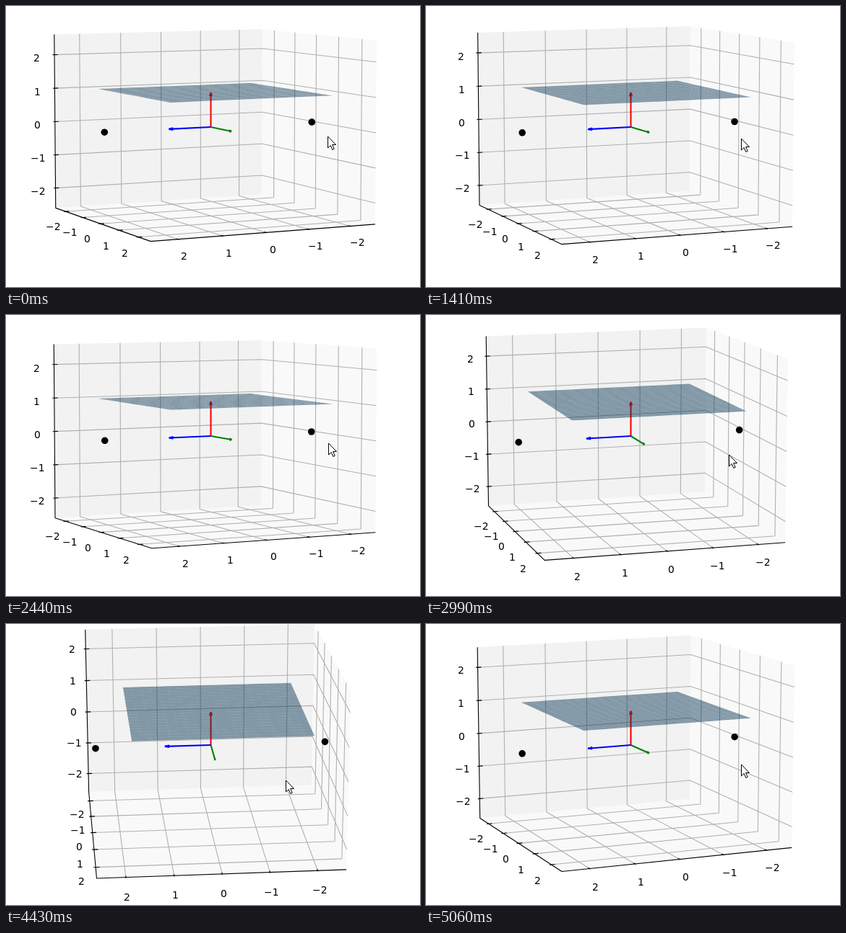
An HTML page with a canvas that plays this animation: 573 px wide and 390 px high, repeating every 5140 ms.

```html
<!DOCTYPE html>
<html lang="en">
<head>
<meta charset="utf-8">
<title>Rotating 3D axes</title>
<style>
html, body { margin: 0; width: 100%; height: 100%; overflow: hidden; background: #fff; }
canvas { display: block; }
</style>
</head>
<body>
<canvas id="view" width="573" height="390"></canvas>
<script>
const ctx = document.getElementById('view').getContext('2d');
const LOOP = 5140, STEP = 78.5;
const ZOOM = 2678, CX = 283.5, CY = 168, DIST = 10;
const SXY = 0.2381, SZ = 0.17857;      // data unit to world unit
const B = 2.604, LABEL = B + 0.3;      // pane bound, label position
const LO = -2, HI = 1.8, CELL = 0.2;   // surface mesh

// Mouse drags: each turns the view to a new azimuth and elevation
const START = { azim: 64.1, elev: 5.8 };
const DRAGS = [
  { from: 0, to: 620, azim: 72.7, elev: 8.3 },
  { from: 930, to: 1410, azim: 67.1, elev: 7.1 },
  { from: 1410, to: 1880, azim: 61.2, elev: 4.8 },
  { from: 1960, to: 2440, azim: 63.7, elev: 5 },
  { from: 2440, to: 3540, azim: 82.9, elev: 16.4 },
  { from: 3540, to: 3770, azim: 84.8, elev: 18.8 },
  { from: 4430, to: 5060, azim: 67.2, elev: 10.8 }
];

// The view is redrawn in discrete steps during a drag
function poseAt(t) {
  let { azim, elev } = START;
  for (const d of DRAGS) {
    if (t < d.from) break;
    const steps = Math.round((d.to - d.from) / STEP);
    const p = Math.min(1, Math.floor((t - d.from) / (d.to - d.from) * steps) / steps);
    azim += (d.azim - azim) * p;
    elev += (d.elev - elev) * p;
  }
  return { azim, elev };
}

function camera({ azim, elev }) {
  const a = azim * Math.PI / 180, e = elev * Math.PI / 180;
  const ca = Math.cos(a), sa = Math.sin(a), ce = Math.cos(e), se = Math.sin(e);
  return ([x, y, z]) => {
    const side = (y * ca - x * sa) * SXY;
    const near = (x * ca + y * sa) * SXY;
    const up = z * SZ;
    const k = ZOOM / (DIST - near * ce - up * se);
    return [CX + side * k, CY - (up * ce - near * se) * k];
  };
}

function path(points) {
  ctx.beginPath();
  points.forEach(p => ctx.lineTo(...p));
}

function line(points, color, width = 1.1) {
  path(points);
  ctx.strokeStyle = color;
  ctx.lineWidth = width;
  ctx.stroke();
}

function fill(points, color) {
  path(points);
  ctx.closePath();
  ctx.fillStyle = color;
  ctx.fill();
}

function label(value, [x, y]) {
  const text = String(value).replace('-', '\u2212');
  ctx.fillStyle = '#000';
  ctx.fillText(text, Math.round(x - ctx.measureText(text).width / 2), Math.round(y + 10.4));
}

function drawBox(proj) {
  const pts = list => list.map(proj);
  fill(pts([[-B, -B, -B], [-B, B, -B], [-B, B, B], [-B, -B, B]]), '#f9f9f9');
  fill(pts([[-B, -B, -B], [B, -B, -B], [B, -B, B], [-B, -B, B]]), '#f2f2f2');
  fill(pts([[-B, -B, -B], [B, -B, -B], [B, B, -B], [-B, B, -B]]), '#f9f9f9');

  for (let t = -2; t <= 2; t++) {
    line(pts([[t, B, -B], [t, -B, -B], [t, -B, B]]), '#b0b0b0');
    line(pts([[B, t, -B], [-B, t, -B], [-B, t, B]]), '#b0b0b0');
    line(pts([[B, -B, t], [-B, -B, t], [-B, B, t]]), '#b0b0b0');
  }

  line(pts([[B, -B, B], [B, -B, -B], [B, B, -B], [-B, B, -B]]), '#000');
  const out = B + 0.042, inner = B - 0.083;
  for (let t = -2; t <= 2; t++) {
    line(pts([[t, out, -B], [t, inner, -B]]), '#000');
    line(pts([[out, t, -B], [inner, t, -B]]), '#000');
    line(pts([[out, -B, t], [inner, -B, t]]), '#000');
    label(t, proj([t, LABEL, -LABEL]));
    label(t, proj([LABEL, t, -LABEL]));
    label(t, proj([LABEL, -LABEL, t]));
  }
}

// Unit vector along one axis, its head spread along another
function arrow(proj, axis, spread, color) {
  const tip = [0, 0, 0];
  tip[axis] = 1;
  const barb = side => {
    const p = tip.map(v => v * 0.9);
    p[spread] = side * 0.027;
    return proj(p);
  };
  line([proj([0, 0, 0]), proj(tip)], color, 2.1);
  line([barb(1), proj(tip), barb(-1)], color, 2.1);
}

function drawSurface(proj) {
  for (let x = LO; x < HI - 0.01; x += CELL) {
    for (let y = LO; y < HI - 0.01; y += CELL) {
      const cell = [[x, y, 1], [x + CELL, y, 1], [x + CELL, y + CELL, 1], [x, y + CELL, 1]];
      fill(cell.map(proj), 'rgba(15,60,90,.5)');
    }
  }
}

function drawCursor({ azim, elev }) {
  const x = 444.5 - (azim - START.azim) * 2.8, y = 180.5 + (elev - START.elev) * 2.8;
  const shape = [[0, 0], [0, 16], [3.7, 12.5], [6.3, 18.5], [8.7, 17.4], [6.1, 11.5], [11, 11.5], [0, 0]];
  const pts = shape.map(p => [Math.round(x) + 0.5 + p[0], Math.round(y) + p[1]]);
  fill(pts, '#fff');
  line(pts, '#000', 1);
}

function draw(t) {
  const pose = poseAt(t);
  const proj = camera(pose);
  ctx.fillStyle = '#fff';
  ctx.fillRect(0, 0, 573, 390);
  ctx.font = '13.89px "DejaVu Sans", sans-serif';
  ctx.lineJoin = 'bevel';
  drawBox(proj);

  arrow(proj, 2, 0, '#f00');
  arrow(proj, 1, 2, '#008000');
  arrow(proj, 0, 2, '#00f');
  drawSurface(proj);

  for (const x of [-2.5, 2.5]) {
    ctx.beginPath();
    ctx.arc(...proj([x, 0, 0]), 4.8, 0, 7);
    ctx.fillStyle = '#000';
    ctx.fill();
  }
  drawCursor(pose);
}

function frame() {
  draw(performance.now() % LOOP);
  requestAnimationFrame(frame);
}
frame();
</script>
</body>
</html>
```
